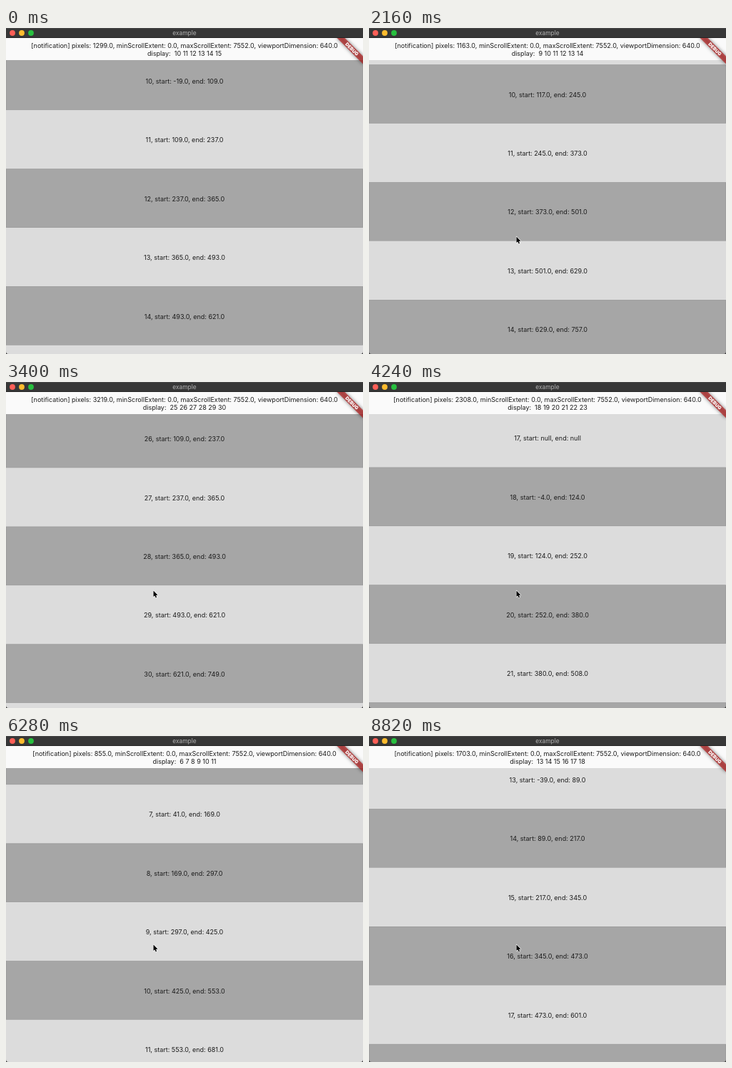
An HTML page with a canvas for the animation above (8900 ms loop, 500 by 457 pixels).

```html
<!DOCTYPE html>
<html lang="en">
<head>
<meta charset="utf-8">
<title>example</title>
<style>
  html, body { margin: 0; width: 100%; height: 100%; overflow: hidden; background: #dcdcdc; }
  canvas { display: block; width: 100vw; height: 100vh; }
</style>
</head>
<body>
<canvas id="stage" width="500" height="457"></canvas>
<script>
const ctx = document.getElementById('stage').getContext('2d');
const W = 500, H = 457, LOOP = 8900, STEP = 20;
const BAR = 14, LIST = 45;
const VIEW = 640, ITEM = 128, SCALE = (H - LIST) / VIEW;
const FONT = 'Inter, Roboto, sans-serif';

// Scroll path: time in ms, offset, speed per 20 ms step
const PATH = [
  [660, 1299, 0], [800, 1170, -31], [1100, 872, -12.5], [1400, 752, -5], [1800, 674, 0],
  [1940, 674, 0], [2140, 1163, 100], [2160, 1270, 107], [2460, 2330, 43], [2760, 2740, 17],
  [3080, 2890, 6], [3220, 2925, 5], [3380, 3219, 115], [3400, 3339, 118], [3560, 4070, 70],
  [3700, 4400, 0], [4220, 2308, -122], [4240, 2188, -120], [4560, 760, -56], [4860, 0, -40],
  [4861, 0, 0], [5480, 0, 0], [5640, 290, 41], [5940, 684, 16.5], [6260, 855, 5.5],
  [6280, 860, 5], [6340, 862, -8], [6660, 0, -55], [6661, 0, 0],
  [7360, 0, 0], [7500, 141, 20], [7520, 162, 24], [7640, 480, 76], [7940, 1214, 30],
  [8240, 1507, 12], [8540, 1634, 5], [8800, 1703, 0]
];

function offsetAt(t) {
  if (t <= PATH[0][0]) return PATH[0][1];
  const n = PATH.findIndex(key => key[0] >= t);
  if (n < 0) return PATH[PATH.length - 1][1];
  const [t0, p0, v0] = PATH[n - 1], [t1, p1, v1] = PATH[n];
  const d = t1 - t0, u = (t - t0) / d, u2 = u * u, u3 = u2 * u;
  const p = p0 * (2 * u3 - 3 * u2 + 1) + p1 * (3 * u2 - 2 * u3)
    + (v0 * (u3 - 2 * u2 + u) + v1 * (u3 - u2)) * d / STEP;
  return Math.max(0, Math.round(p));
}

function rect(color, x, y, w, h) {
  ctx.fillStyle = color;
  ctx.fillRect(x, y, w, h);
}

function text(str, y, color = '#1c1c1c', size = 9.02) {
  ctx.font = `${size}px ${FONT}`;
  ctx.textAlign = 'center';
  ctx.fillStyle = color;
  ctx.fillText(str, W / 2, y);
}

function drawList(drawn, shown, first, last) {
  const end = Math.floor((drawn + VIEW - 1) / ITEM);
  for (let i = Math.floor(drawn / ITEM); i <= end; i++) {
    const y = LIST + (i * ITEM - drawn) * SCALE, h = ITEM * SCALE;
    rect(i % 2 ? '#dcdcdc' : '#a6a6a6', 0, y, W, h);
    if (i % 2 === 0) {
      ctx.strokeStyle = '#9b9b9b';
      ctx.lineWidth = 0.6;
      ctx.strokeRect(0.3, y + 0.3, W - 0.6, h - 0.6);
    }
    const listed = i >= first && i <= last;
    const start = listed ? (i * ITEM - shown).toFixed(1) : 'null';
    const stop = listed ? ((i + 1) * ITEM - shown).toFixed(1) : 'null';
    text(`${i}, start: ${start}, end: ${stop}`, y + h / 2 + 4);
  }
}

function drawHeader(shown, first, last) {
  rect('#fafafa', 0, BAR, W, LIST - BAR);
  text(`[notification] pixels: ${shown.toFixed(1)}, minScrollExtent: 0.0, ` +
    'maxScrollExtent: 7552.0, viewportDimension: 640.0', 28.2);
  const ids = Array.from({ length: last - first + 1 }, (_, k) => first + k);
  text('display:  ' + ids.join(' '), 38.8);
}

function drawBanner() {
  ctx.save();
  ctx.translate(W, BAR);
  ctx.scale(SCALE, SCALE);
  ctx.rotate(Math.PI / 4);
  ctx.filter = 'blur(2.5px)';
  rect('rgba(0,0,0,0.5)', -40, 28, 80, 12);
  ctx.filter = 'none';
  rect('rgba(183,28,28,0.68)', -40, 28, 80, 12);
  ctx.font = `900 10.2px ${FONT}`;
  ctx.textAlign = 'center';
  ctx.fillStyle = '#fff';
  ctx.fillText('DEBUG', 0, 37.7);
  ctx.restore();
}

function drawBar() {
  rect('#373737', 0, 0, W, BAR);
  rect('#505050', 0, 0, W, 0.7);
  rect('#161616', 0, BAR - 0.6, W, 0.6);
  ['#fe5f57', '#febc2e', '#28c03f'].forEach((color, k) => {
    ctx.fillStyle = color;
    ctx.beginPath();
    ctx.arc(9 + 13 * k, 7, 3.9, 0, 7);
    ctx.fill();
  });
  text('example', 10.2, '#b4b4b4', 8.37);
}

function drawCorners() {
  const r = 3.5;
  ctx.fillStyle = '#2b2b2b';
  for (const [x, s] of [[0, 1], [W, -1]]) {
    ctx.beginPath();
    ctx.moveTo(x, H - r);
    ctx.quadraticCurveTo(x, H, x + s * r, H);
    ctx.lineTo(x, H);
    ctx.fill();
  }
}

function drawPointer(t) {
  if (t < 60) return;
  const rest = (1 - Math.min(1, (t - 60) / 200)) ** 2;
  ctx.save();
  ctx.translate(206.5 + 267 * rest, 292.5 + 141 * rest);
  ctx.beginPath();
  for (const [x, y] of [[0, 0], [0, 8.6], [1.9, 6.9], [3.2, 9.9], [4.6, 9.3], [3.4, 6.4], [6, 6.2]]) {
    ctx.lineTo(x, y);
  }
  ctx.closePath();
  ctx.strokeStyle = '#fff';
  ctx.lineWidth = 1.2;
  ctx.lineJoin = 'round';
  ctx.stroke();
  ctx.fillStyle = '#000';
  ctx.fill();
  ctx.restore();
}

function draw(now) {
  const t = Math.floor((now % LOOP) / STEP) * STEP;
  const drawn = offsetAt(t);
  const shown = offsetAt(t - STEP); // labels trail the list by one step
  const first = Math.floor(shown / ITEM);
  const last = Math.floor((shown + VIEW - 1) / ITEM);
  drawList(drawn, shown, first, last);
  drawHeader(shown, first, last);
  drawBanner();
  drawBar();
  drawCorners();
  drawPointer(t);
}

const begin = performance.now();
function tick() {
  draw(performance.now() - begin);
  requestAnimationFrame(tick);
}
tick();
</script>
</body>
</html>
```
